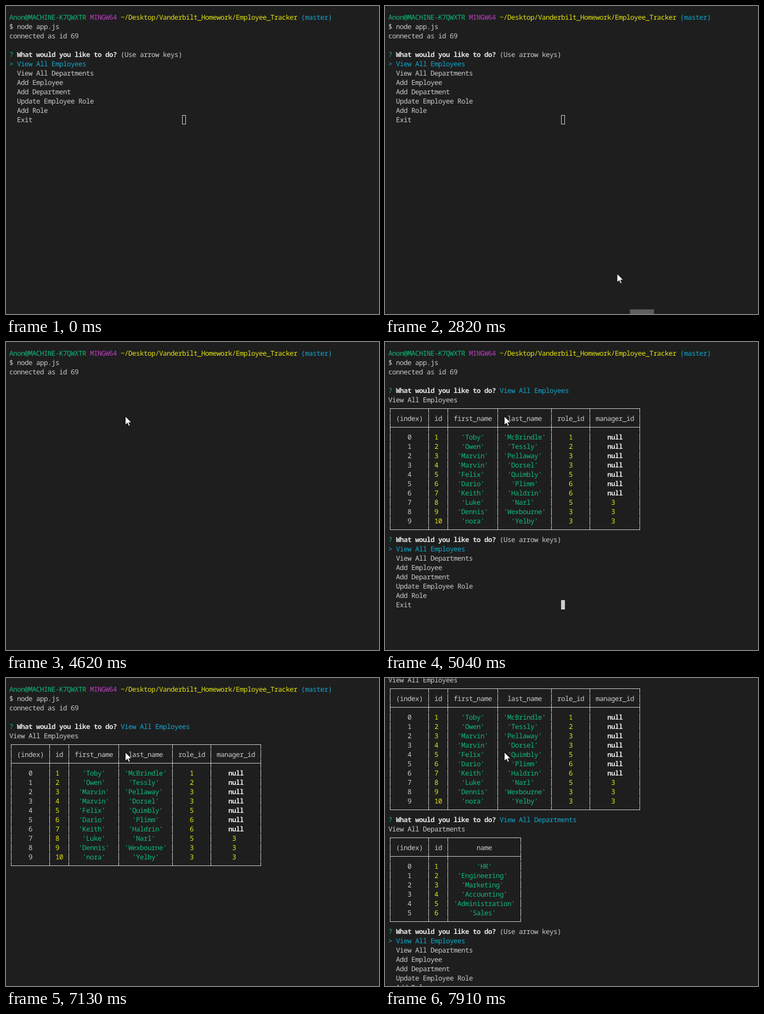
An HTML page for the animation above (8000 ms loop, 680 by 562 pixels).

```html
<!DOCTYPE html>
<html lang="en">
<head>
<meta charset="utf-8">
<title>Employee tracker terminal</title>
<style>
  html, body { margin: 0; width: 100%; height: 100%; overflow: hidden; background: #1e1e1e; }
  #stage { position: relative; width: 680px; height: 562px; overflow: hidden; background: #1e1e1e; }
  #screen, .part, #pointer, #click, #tip { position: absolute; left: 0; top: 0; }
  /* Glyphs are set a little tighter than their natural advance, on a 7px cell. */
  pre {
    position: absolute; left: 6px; margin: 0; color: #ccc; white-space: pre;
    font: 500 12.5px/17px "Noto Sans Mono", "DejaVu Sans Mono", monospace;
    letter-spacing: -.5px; text-rendering: geometricPrecision;
  }
  svg { position: absolute; left: 0; top: 0; overflow: visible; }
  b { color: #e5e5e5; font-weight: 700; }
  .green { color: #0dbc79; }
  .yellow { color: #e5e510; }
  .cyan { color: #11a8cd; }
  .magenta { color: #bc3fbc; }
  .cursor { position: absolute; box-sizing: border-box; width: 7px; height: 17px; border: 1px solid #ccc; background: #ccc; }

  .part, .cursor, #screen { animation: 8s step-end infinite; }
  #menu1 { animation-name: menu1; }
  #menu1 .cursor { animation-name: focus; }
  #answer1 { animation-name: answer1; }
  #table1 { animation-name: table1; }
  #menu2 { animation-name: menu2; }
  #menu3 { animation-name: menu3; }
  #answer2 { animation-name: answer2; }
  #table2, #menu4 { animation-name: table2; }
  #screen { animation-name: scroll; }
  @keyframes menu1 { 0% { visibility: visible } 57.75%, 100% { visibility: hidden } }
  @keyframes focus { 0% { background: #1e1e1e } 44.25%, 100% { background: #ccc } }
  @keyframes answer1 { 0% { visibility: hidden } 59.75%, 100% { visibility: visible } }
  @keyframes table1 { 0% { visibility: hidden } 60.375%, 100% { visibility: visible } }
  @keyframes menu2 { 0%, 78.875%, 100% { visibility: hidden } 60.875% { visibility: visible } }
  @keyframes menu3 { 0%, 89.125%, 100% { visibility: hidden } 79.25% { visibility: visible } }
  @keyframes answer2 { 0% { visibility: hidden } 89.5%, 100% { visibility: visible } }
  @keyframes table2 { 0% { visibility: hidden } 89.875%, 100% { visibility: visible } }
  @keyframes scroll { 0% { transform: none } 89.875%, 100% { transform: translateY(-102px) } }

  #tip {
    left: 446px; top: 553px; width: 45px; height: 20px; box-sizing: border-box;
    border: 1px solid #767676; background: #f7f7f7; animation: tip 8s linear infinite;
  }
  @keyframes tip { 0%, .25% { opacity: 0 } 3%, 33.75% { opacity: 1 } 35.9%, 100% { opacity: 0 } }

  #click {
    left: 208.5px; top: 126.5px; width: 17px; height: 17px; border-radius: 50%;
    background: #c4c01c; animation: click 8s linear infinite;
  }
  @keyframes click { 0%, 42.9% { opacity: 0 } 44.25%, 46% { opacity: 1 } 48.375%, 100% { opacity: 0 } }

  #pointer { width: 13px; height: 20px; animation: move 8s linear infinite; }
  @keyframes move {
    0% { transform: translate(468px, 566px) }
    33.75% { transform: translate(468px, 566px); animation-timing-function: ease-in-out }
    38.875%, 100% { transform: translate(217px, 135px) }
  }
</style>
</head>
<body>
<div id="stage">
  <div id="screen"></div>
  <div id="tip"></div>
  <div id="click"></div>
  <svg id="pointer"><path d="M.5 .5V16.5L4.3 12.9 6.8 18.5 9.3 17.4 6.9 12H12Z" fill="#fff" stroke="#111"/></svg>
</div>
<script>
  const CELL = 7, LINE = 17, LEFT = 6, TOP = 12;
  const screen = document.getElementById('screen');
  const color = (name, text) => `<span class="${name}">${text}</span>`;
  const bold = text => `<b>${text}</b>`;

  const text = (row, lines) =>
    `<pre style="top:${TOP + row * LINE}px">${lines.join('\n')}</pre>`;

  const cursor = (row, col) =>
    `<i class="cursor" style="left:${LEFT + col * CELL}px;top:${TOP + row * LINE}px"></i>`;

  const part = (id, html) =>
    screen.insertAdjacentHTML('beforeend', `<div class="part" id="${id}">${html}</div>`);

  const question = color('green', '?') + ' ' + bold('What would you like to do?') + ' ';
  const options = ['View All Employees', 'View All Departments', 'Add Employee',
    'Add Department', 'Update Employee Role', 'Add Role', 'Exit'];

  function menu(id, row, selected, hint) {
    const items = options.map((name, i) =>
      i === selected ? color('cyan', '&gt; ' + name) : '  ' + name);
    part(id, text(row, [question + hint, ...items]) + cursor(row + 7, 29 + hint.length));
  }

  function answer(id, row, choice) {
    part(id, text(row, [question + color('cyan', choice), choice]));
  }

  function cell(value, width, plain) {
    const label = typeof value === 'string' && !plain ? `'${value}'` : String(value);
    const before = Math.floor((width - label.length) / 2);
    const shown = plain ? label
      : value === null ? bold(label)
      : color(typeof value === 'number' ? 'yellow' : 'green', label);
    return ' '.repeat(before) + shown + ' '.repeat(width - label.length - before);
  }

  // Each box-drawing stroke is 16px tall inside a 17px line.
  function grid(row, widths, count) {
    let col = 0;
    const bars = [0, ...widths.map(w => col += w + 1)].map(c => LEFT + c * CELL + 3.5);
    const last = count + 3;
    let d = '';
    for (let i = 0; i <= last; i++) {
      const y = TOP + (row + i) * LINE;
      const from = y + (i === 0 ? 7 : 0), to = y + (i === last ? 8 : 16);
      for (const x of bars) d += `M${x} ${from}V${to}`;
      if (i === 0 || i === 2 || i === last) d += `M${bars[0]} ${y + 7.5}H${bars[bars.length - 1]}`;
    }
    return `<svg width="680" height="562"><path d="${d}" fill="none" stroke="#ccc"/></svg>`;
  }

  function table(id, row, widths, heads, records) {
    const join = cells => ' ' + cells.join(' ');
    const lines = records.map((record, i) =>
      join([cell(i, widths[0], true), ...record.map((v, k) => cell(v, widths[k + 1]))]));
    part(id, grid(row, widths, records.length) +
      text(row + 1, [join(heads.map((h, k) => cell(h, widths[k], true))), '', ...lines]));
  }

  screen.innerHTML = text(0, [
    color('green', 'Anon@MACHINE-K7QWXTR') + ' ' + color('magenta', 'MINGW64') + ' ' +
      color('yellow', '~/Desktop/Vanderbilt_Homework/Employee_Tracker') + ' ' + color('cyan', '(master)'),
    '$ node app.js',
    'connected as id 69'
  ]);

  const people = [
    ['Toby', 'McBrindle', 1, null], ['Owen', 'Tessly', 2, null],
    ['Marvin', 'Pellaway', 3, null], ['Marvin', 'Dorsel', 3, null],
    ['Felix', 'Quimbly', 5, null], ['Dario', 'Plimm', 6, null],
    ['Keith', 'Haldrin', 6, null], ['Luke', 'Narl', 5, 3],
    ['Dennis', 'Wexbourne', 3, 3], ['nora', 'Yelby', 3, 3]
  ];
  const departments = ['HR', 'Engineering', 'Marketing', 'Accounting', 'Administration', 'Sales'];
  const hint = '(Use arrow keys)';

  menu('menu1', 4, 0, hint);
  answer('answer1', 4, options[0]);
  table('table1', 6, [9, 4, 12, 13, 9, 12],
    ['(index)', 'id', 'first_name', 'last_name', 'role_id', 'manager_id'],
    people.map((p, i) => [i + 1, ...p]));
  menu('menu2', 20, 0, hint);
  menu('menu3', 20, 1, '');
  answer('answer2', 20, options[1]);
  table('table2', 22, [9, 4, 18], ['(index)', 'id', 'name'],
    departments.map((name, i) => [i + 1, name]));
  menu('menu4', 32, 0, hint);
</script>
</body>
</html>
```
